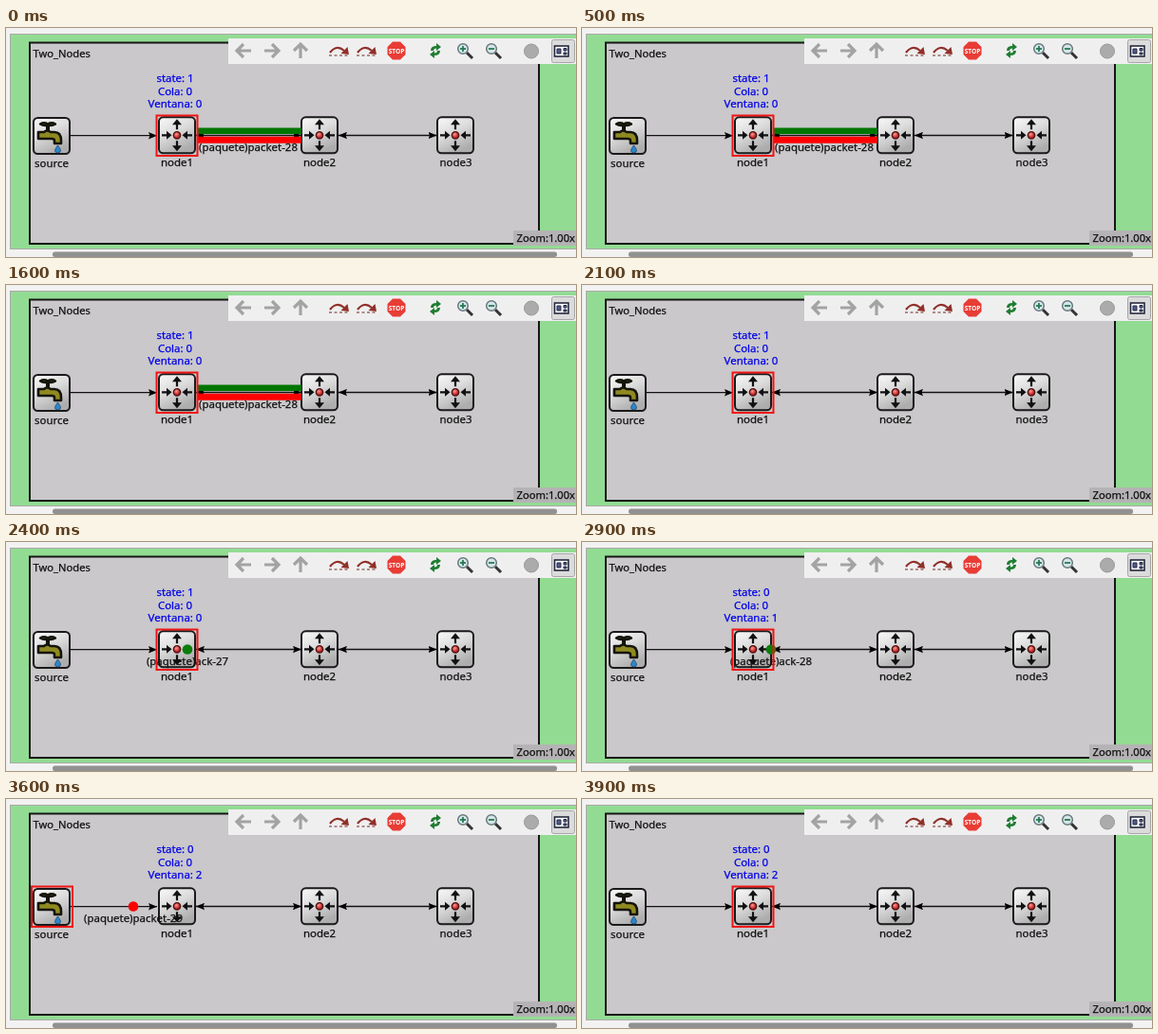
Write an HTML page that moves like this. It is 600x242 px and loops after 4000 ms.

```html
<!DOCTYPE html>
<html lang="en">
<head>
<meta charset="utf-8">
<title>Two_Nodes</title>
<style>
  html, body { margin: 0; width: 100%; height: 100%; overflow: hidden; background: #f3f2f2; }
  svg { display: block; width: 600px; height: 242px; }
  text { font: 11.45px "Noto Sans", "Open Sans", sans-serif; fill: #111; stroke: #111; stroke-width: 0.25; }
  .mid { text-anchor: middle; }
  .small { font-size: 11.2px; }
  #status text { fill: #0000e8; stroke: #0000e8; }
  .wire { stroke: #111; stroke-width: 1.4; fill: none; }
</style>
</head>
<body>
<svg viewBox="0 0 600 242">
  <defs>
    <linearGradient id="metal" x1="0" y1="0" x2="0.5" y2="1">
      <stop offset="0" stop-color="#fafafa"/>
      <stop offset="0.5" stop-color="#dcdbdc"/>
      <stop offset="1" stop-color="#aeadae"/>
    </linearGradient>
    <radialGradient id="ball" cx="0.4" cy="0.35">
      <stop offset="0" stop-color="#ff9a90"/>
      <stop offset="1" stop-color="#c02020"/>
    </radialGradient>
    <marker id="head" viewBox="0 0 9 8" refX="9" refY="4" markerWidth="9" markerHeight="8"
            markerUnits="userSpaceOnUse" orient="auto-start-reverse">
      <path d="M0 0.3L9 4L0 7.7L1.5 4Z" fill="#000"/>
    </marker>
    <rect id="tile" x="-19" y="-19" width="38" height="38" rx="4.5"
          fill="url(#metal)" stroke="#1a1a1a" stroke-width="2"/>
    <g id="router">
      <use href="#tile"/>
      <path d="M0 -6V-12M0 6V12M-16 0H-9M16 0H9" stroke="#111" stroke-width="2.2"/>
      <path d="M-5 -11L0 -17L5 -11ZM-5 11L0 17L5 11ZM-11 -4.5L-5.5 0L-11 4.5ZM11 -4.5L5.5 0L11 4.5Z" fill="#111"/>
      <circle r="3.7" fill="url(#ball)" stroke="#4a1515" stroke-width="1.3"/>
    </g>
    <g id="tap" stroke="#15140a" stroke-linejoin="round">
      <use href="#tile"/>
      <path d="M-14 -4H-8Q-5 -7 -1 -4H3Q10 -4 10 5V8H3V5Q3 3 0 3H-14Z" fill="#8f8a20" stroke-width="2.6"/>
      <path d="M-4 -5V-11" stroke-width="4"/>
      <path d="M-12 -12.5Q-8 -15 -4 -12.5Q0 -15 4 -12.5Q0 -10 -4 -11.5Q-8 -10 -12 -12.5Z"
            fill="#8f8a20" stroke-width="2.4"/>
      <path d="M6.5 10Q10.5 15 9 17Q6.5 19 4 17Q2.5 15 6.5 10Z" fill="#2e86c8" stroke="#174a78" stroke-width="0.8"/>
    </g>
    <path id="back" d="M8 0H-6M0 -7L-7 0L0 7" fill="none" stroke="#a3a3a3" stroke-width="3.2"/>
    <g id="hop">
      <path d="M-10 2Q-3 -7 5 0" fill="none" stroke="#8f3028" stroke-width="2.2"/>
      <path d="M10 4L1.5 3L8.5 -4Z" fill="#8f3028"/>
      <path d="M-11 5H11" stroke="#b08a86" stroke-width="2" stroke-dasharray="3 2.5"/>
    </g>
    <g id="lens">
      <path d="M2 2L8 8" stroke="#333" stroke-width="3"/>
      <circle cx="-2" cy="-2" r="5.3" fill="#d5e6e8" stroke="#66787c" stroke-width="1.5"/>
      <path d="M-5 -2H1" stroke="#267a54" stroke-width="1.8"/>
    </g>
    <path id="turn" d="M-5 1Q-5 -4 1 -4V-7L6 -3L1 1V-1.5Q-2 -1.5 -2 1Z" fill="#1f7d32"/>
  </defs>

  <rect x="4.5" y="6.5" width="600" height="227" fill="#92db92" stroke="#aaa9a9"/>
  <rect x="25" y="15.5" width="536" height="212.5" fill="#cac8ca" stroke="#161616" stroke-width="2"/>
  <text class="small" x="28.5" y="31">Two_Nodes</text>
  <rect x="49" y="236.5" width="531" height="5.5" rx="2.5" fill="#929192"/>
  <rect x="534" y="214" width="66" height="16" fill="#b5b3b5"/>
  <text class="small" x="537.5" y="226">Zoom:1.00x</text>

  <g id="toolbar">
    <rect x="234" y="11" width="366" height="27" fill="#f0eff0"/>
    <use href="#back" x="250" y="24"/>
    <use href="#back" transform="translate(280 24) scale(-1 1)"/>
    <use href="#back" transform="translate(310 24) rotate(90)"/>
    <use href="#hop" x="351" y="24"/>
    <use href="#hop" x="380" y="24"/>
    <path d="M407 14.5H415L420.5 20V28L415 33.5H407L401.5 28V20Z" fill="#e83c35"/>
    <text class="mid" x="411" y="26.5" style="font-size:6.6px;font-weight:700;fill:#fff;stroke:none">STOP</text>
    <use href="#turn" x="452" y="23"/>
    <use href="#turn" transform="translate(452 25) rotate(180)"/>
    <use href="#lens" x="483" y="24"/>
    <path d="M481 19V25" stroke="#267a54" stroke-width="1.8"/>
    <use href="#lens" x="513" y="24"/>
    <circle cx="553" cy="24.5" r="7.5" fill="#ababab" stroke="#989898"/>
    <rect x="574.5" y="12.5" width="24" height="24" rx="2" fill="#dcdbdc" stroke="#a6a5a6"/>
    <rect x="577.5" y="19" width="14.5" height="11" fill="#fff" stroke="#23283e" stroke-width="1.6"/>
    <path d="M580 22H584V27H580ZM587 21.5H590V24H587ZM587 26H590V28H587Z" fill="#525c92" stroke="#23283e"/>
  </g>

  <path class="wire" d="M68 113.7H159" marker-end="url(#head)" style="stroke-width:1.2"/>
  <path class="wire" d="M200 113.5H311" marker-start="url(#head)" marker-end="url(#head)"/>
  <path class="wire" d="M350 113.5H453.5" marker-start="url(#head)" marker-end="url(#head)" style="stroke-width:1.7"/>

  <use href="#tap" x="48" y="114"/>
  <use href="#router" x="180" y="113.3"/>
  <use href="#router" x="330" y="113.3"/>
  <use href="#router" x="473" y="113.3"/>
  <g class="mid">
    <text x="48" y="147">source</text>
    <text x="180" y="146">node1</text>
    <text x="330" y="146">node2</text>
    <text x="473.5" y="146">node3</text>
  </g>

  <g id="status" class="mid">
    <text id="state" x="178" y="57"></text>
    <text x="178" y="70.5">Cola: 0</text>
    <text id="window" x="178" y="84"></text>
  </g>

  <g id="transmission">
    <path d="M201 108.8H311" stroke="#007500" stroke-width="6.6"/>
    <path d="M201 118.2H311" stroke="#ff0000" stroke-width="7"/>
    <text class="mid" x="255" y="130">(paquete)packet-28</text>
  </g>

  <g id="message">
    <circle cy="113.5" r="5.3"/>
    <text class="mid" y="129.5"></text>
  </g>
  <rect id="marker" y="92.5" width="43" height="42.5" fill="none" stroke="#f01414" stroke-width="2"/>
</svg>

<script>
  const LOOP = 4000, STEP = 100;
  const $ = id => document.getElementById(id);
  const message = $("message"), dot = message.querySelector("circle"), label = message.querySelector("text");

  // x is the position at time "from"; speed is in pixels per step
  const messages = [
    { name: "ack-27", from: 2300, to: 2500, x: 199, speed: -8, color: "#0a7d0a" },
    { name: "ack-28", from: 2900, to: 3100, x: 199, speed: -8, color: "#0a7d0a" },
    { name: "packet-29", from: 3200, to: 3900, x: 78, speed: 14, color: "#ff0000" }
  ];
  const show = (element, visible) => element.setAttribute("visibility", visible ? "visible" : "hidden");

  function draw(t) {
    $("state").textContent = "state: " + (t < 2500 ? 1 : 0);
    $("window").textContent = "Ventana: " + (t < 2500 ? 0 : t < 3100 ? 1 : 2);
    show($("transmission"), t < 2000);
    $("marker").setAttribute("x", t >= 3100 && t < 3800 ? 27 : 158.5);

    const current = messages.find(m => t >= m.from && t < m.to);
    show(message, current);
    if (current) {
      const x = current.x + current.speed * (t - current.from) / STEP;
      message.setAttribute("transform", `translate(${x} 0)`);
      dot.setAttribute("fill", current.color);
      label.textContent = `(paquete)${current.name}`;
    }
  }

  const start = performance.now();
  function tick() {
    const t = (performance.now() - start) % LOOP;
    draw(Math.floor(t / STEP) * STEP);
    requestAnimationFrame(tick);
  }
  tick();
</script>
</body>
</html>
```
